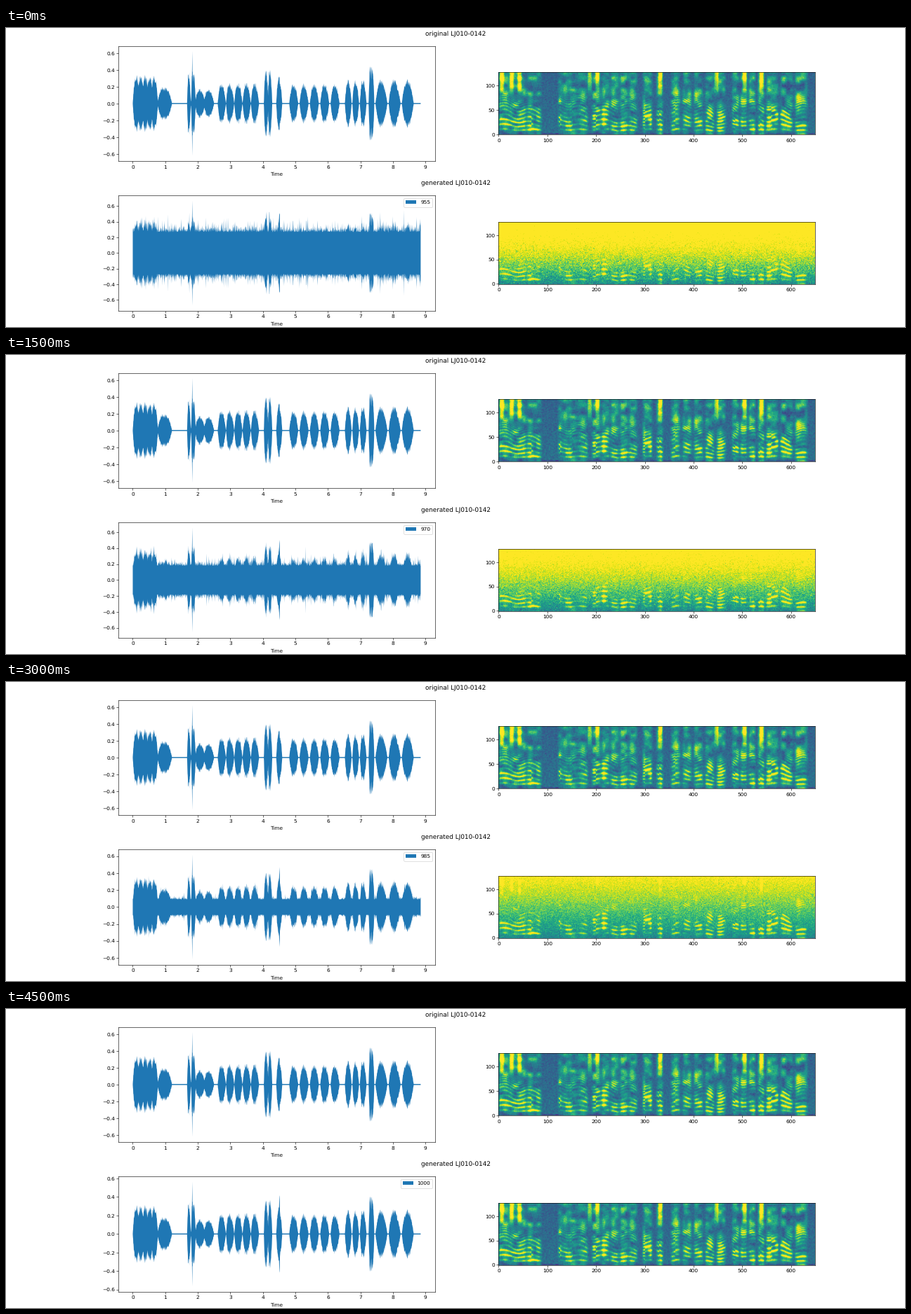
These frames come from a looping animation (1280x427 px, 5 s). A matplotlib script:

```python
import numpy as np
import matplotlib.pyplot as plt
from matplotlib.animation import FuncAnimation
from matplotlib.ticker import MultipleLocator

DURATION = 8.85
COLS, BINS = 650, 128
FRAMES = 10
CLIP = "LJ010-0142"
ACCENT = 1.83

# Evenly spaced syllables: first, last (seconds), count, half width, loudness
RUNS = [
    (.10, .65, 5, .10, .33), (.92, 1.0, 2, .16, .19), (1.72, 1.87, 2, .05, .38),
    (2.05, 2.32, 2, .14, .17), (2.72, 3.74, 5, .11, .24), (4.09, 4.21, 2, .06, .40),
    (4.49, 4.49, 1, .08, .32), (4.93, 6.20, 5, .12, .23), (6.61, 7.07, 3, .09, .28),
    (7.30, 7.36, 2, .05, .46), (7.62, 8.43, 3, .16, .28),
]
HISS_COLUMNS = [7, 27, 43, 187, 203, 332, 447, 505, 540]


def bell(x, centre, width):
    return np.exp(-((x - centre) / width) ** 2)


def smooth(field, size, axis):
    return sum(np.roll(field, k - size // 2, axis) for k in range(size)) / size


def loudness(t):
    level = .8 * .62 * bell(t, ACCENT, .025)
    for first, last, count, half, amp in RUNS:
        for centre in np.linspace(first, last, count):
            u = (t - centre) / half
            u = np.where(u > 0, u / 1.3, u)  # quick attack, slower decay
            level = np.maximum(level, amp * np.clip(1 - np.abs(u) ** 2.2, 0, 1))
    return level


def speech_spectrogram():
    rng = np.random.default_rng(3)
    col = np.arange(COLS)
    t = col * DURATION / COLS
    bins = np.arange(BINS)[:, None]
    voice = smooth(np.clip(loudness(t) / .22, 0, 1) ** .6, 5, 0)

    # mel scale: linear up to 1 kHz, then logarithmic
    freq = np.where(bins < 42, bins * 1000 / 42,
                    1000 * np.exp((bins - 42) * np.log(8) / 86))
    starts = np.array([0] + [run[0] for run in RUNS[1:]])
    start = starts[np.searchsorted(starts, t, side="right") - 1]
    pitch = 235 - 50 * (t - start) + 22 * np.sin(9 * t)
    clear = np.exp(-(bins / 85) ** 4)
    ridge = clear * np.cos(np.pi * freq / pitch) ** 4 + (1 - clear) * .4
    formants = (bell(bins, 20 + 7 * np.sin(5 * t), 16)
                + .85 * bell(bins, 56 + 14 * np.sin(3.7 * t + 1), 16)
                + .7 * bell(bins, 86 + 7 * np.sin(4.4 * t), 11)
                + .6 * bell(bins, 114, 10))
    blotch = np.kron(rng.random((16, 65)), np.ones((8, 10)))
    blotch = smooth(smooth(blotch, 7, 0), 7, 1)

    image = .37 - .06 * bins / BINS + .3 * voice * (blotch - .4)
    image = image + .75 * voice * formants * (.25 + .75 * ridge) * (.45 + blotch)
    rise = 1 / (1 + np.exp((92 - bins) / 7))
    for centre in HISS_COLUMNS:
        image = image + .55 * rise * np.exp(-((col - centre) / 4.5) ** 4)
    image = image - .12 * (bins < 3) + .15 * (bins > 123) * voice
    grain = smooth(smooth(rng.normal(0, .08, (BINS, COLS)), 2, 0), 2, 1)
    return np.clip(image + grain, 0, 1)


def noisy_spectrogram(i, left):
    if left == 0:
        return clean
    rng = np.random.default_rng(100 + i)
    floor = .45 + (.38 + .75 * left) * np.arange(BINS)[:, None] / BINS
    noise = rng.normal(0, .08 + .09 * left, clean.shape)
    return np.clip(np.maximum(clean, floor + noise), 0, 1)


def noisy_envelope(i, left):
    rng = np.random.default_rng(200 + i)
    peak = .565 + .105 * np.sin(left * np.pi / 2)
    noise = .28 * left
    tail = rng.exponential(size=time.size)
    hum = noise * (.95 + .13 * tail)
    spoken = voice_made + noise * (.25 + .13 * tail)
    envelope = np.minimum(np.maximum(hum, spoken), peak)
    envelope[accent] = peak
    return envelope


def draw_wave(ax, envelope, label=None):
    ax.clear()
    ax.fill_between(time, -envelope, envelope, label=label)
    ax.set_xlabel("Time", labelpad=5.3)
    ax.xaxis.set_major_locator(MultipleLocator(1))
    ax.yaxis.set_major_locator(MultipleLocator(.2))
    ax.set_xlim(-.05 * DURATION, 1.05 * DURATION)
    limit = 1.1 * envelope.max()
    ax.set_ylim(-limit, limit)
    if label:
        ax.legend(loc="upper right")


def draw_image(ax, image):
    return ax.imshow(image, origin="lower", cmap="viridis", vmin=0, vmax=1)


time = np.linspace(0, DURATION, 1640)
accent = np.argmin(np.abs(time - ACCENT))
texture = np.random.default_rng(1).uniform(.75, 1.05, time.size)
voice_true = np.maximum(loudness(time) * texture, .006)
voice_true[accent] = .623
voice_made = np.maximum(.92 * voice_true, .42 * bell(time, 4.51, .02))
clean = speech_spectrogram()

plt.rcParams["text.hinting"] = "none"
fig = plt.figure(figsize=(24, 8.00626), dpi=160 / 3)
top, bottom = fig.subfigures(2, 1)
top.suptitle(f"original {CLIP}")
bottom.suptitle(f"generated {CLIP}")
wave_top, mel_top = top.subplots(1, 2)
wave_bottom, mel_bottom = bottom.subplots(1, 2)
draw_wave(wave_top, voice_true)
draw_image(mel_top, clean)
mel = draw_image(mel_bottom, clean)


def update(i):
    left = 1 - i / (FRAMES - 1)
    draw_wave(wave_bottom, noisy_envelope(i, left), str(955 + 5 * i))
    mel.set_data(noisy_spectrogram(i, left))
    return [mel]


anim = FuncAnimation(fig, update, frames=FRAMES, interval=500,
                     repeat=True, repeat_delay=0, blit=False)
plt.show()
```
